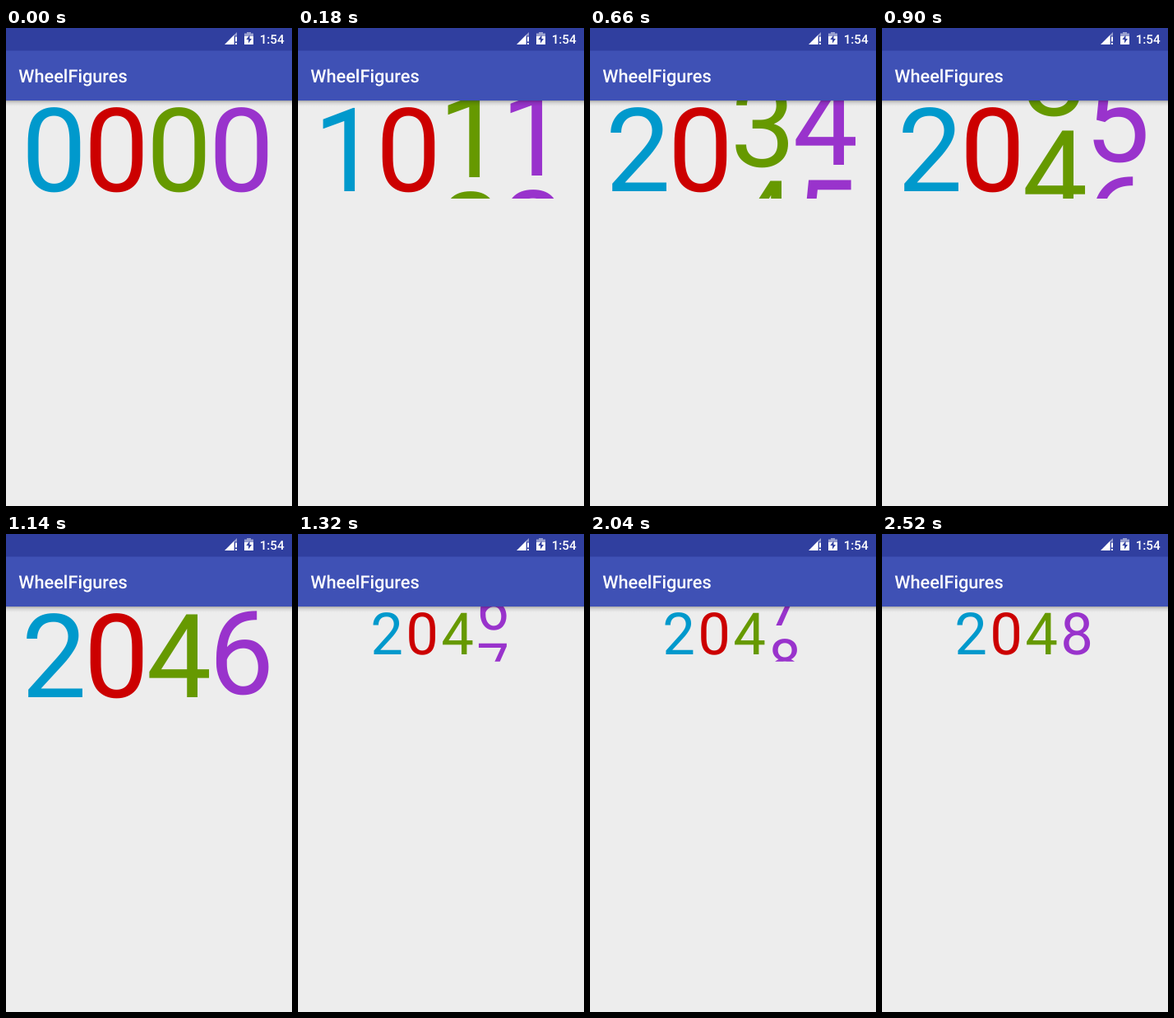
These frames come from a looping animation (348 by 580 pixels, 3.72 s). An HTML page:

```html
<!DOCTYPE html>
<html lang="en">
<head>
<meta charset="utf-8">
<title>Rolling digits</title>
<style>
  html, body { margin: 0; width: 100%; height: 100%; overflow: hidden; background: #ededed; }
  svg { display: block; width: 100%; height: 100%; }
  text { font-family: Roboto, sans-serif; text-rendering: geometricPrecision; }
  .medium { font-weight: 500; fill: #fff; }
</style>
</head>
<body>
<svg viewBox="0 0 348 580">
  <defs>
    <linearGradient id="shade" x2="0" y2="1">
      <stop offset="0" stop-opacity=".28"/>
      <stop offset=".4" stop-opacity=".1"/>
      <stop offset="1" stop-opacity="0"/>
    </linearGradient>
    <clipPath id="window"><rect id="hole" y="88" width="348"/></clipPath>
  </defs>
  <rect width="348" height="580" fill="#ededed"/>
  <g id="digits" clip-path="url(#window)" text-anchor="middle"></g>
  <rect y="88" width="348" height="7" fill="url(#shade)"/>
  <rect y="27" width="348" height="61" fill="#3f51b5"/>
  <rect width="348" height="27.5" fill="#303f9f"/>
  <text class="medium" x="15.3" y="65.7" font-size="21.75">WheelFigures</text>
  <text class="medium" x="308.7" y="19" font-size="15.2">1:54</text>
  <g fill="#fff">
    <path d="M266 20L277.7 8.3V20Z"/>
    <path d="M277.7 8.3L281 5V9.5H277.7Z" opacity=".5"/>
    <path d="M279 10.5h2v6h-2zM279 18h2v2h-2z"/>
    <path d="M290 10V6.5h3V5h5v1.5h3V10Z" opacity=".5"/>
    <path d="M290 10h11v10h-11z"/>
  </g>
  <path d="M296.5 8.5L292.3 14h2.7v4.5L299 13h-2.5z" fill="#303f9f"/>
</svg>
<script>
const LOOP = 3720, TICK = 60, END = 2520, SHRINK = 1200;
const BIG = { size: 141.4, pitch: 75.95, height: 118.9, base: 198.3 };
const SMALL = { size: 70.7, pitch: 43, height: 66.7, base: 146 };
const MIDDLE = 172.5;

// Scroll steps completed at given times: [ms, steps]
const CLOCK = [[0, 0], [360, 15], [660, 33], [1140, 60], [1620, 89], [2040, 112], [END, 136]];

const hole = document.getElementById("hole");
const group = document.getElementById("digits");

function addText(color) {
  const el = document.createElementNS("http://www.w3.org/2000/svg", "text");
  el.setAttribute("fill", color);
  return group.appendChild(el);
}

const columns = [
  { last: 2, color: "#0099cc", lag: 1 },
  { last: 0, color: "#cc0000", lag: 0 },
  { last: 4, color: "#669900", lag: 0 },
  { last: 8, color: "#9933cc", lag: 0 }
].map(c => ({ ...c, texts: [addText(c.color), addText(c.color)] }));

function stepsAt(t) {
  const i = CLOCK.findIndex(([ms]) => ms >= t);
  if (i < 1) return 0;
  const [t0, s0] = CLOCK[i - 1], [t1, s1] = CLOCK[i];
  return Math.round(s0 + (s1 - s0) * (t - t0) / (t1 - t0));
}

// Each digit rolls at a constant speed, slower the nearer it is to the last one.
function roll(last, steps) {
  for (let digit = 0; digit < last; digit++) {
    const speed = 0.15 * (0.6 + 0.5 * Math.cos(Math.PI * digit / last));
    const need = Math.ceil(1 / speed);
    if (steps < need) return { digit, offset: steps * speed };
    steps -= need;
  }
  return { digit: last, offset: 0 };
}

function draw(now) {
  const t = Math.min(END, Math.floor(now % LOOP / TICK) * TICK);
  const look = t < SHRINK ? BIG : SMALL;
  const steps = stepsAt(t);
  hole.setAttribute("height", look.height);
  group.setAttribute("font-size", look.size);
  columns.forEach((c, i) => {
    const { digit, offset } = roll(c.last, Math.max(0, steps - c.lag));
    c.texts.forEach((el, k) => {
      el.textContent = offset || !k ? digit + k : "";
      el.setAttribute("x", MIDDLE + (i - 1.5) * look.pitch);
      el.setAttribute("y", look.base + (k - offset) * look.height);
    });
  });
}

function loop() {
  draw(performance.now());
  requestAnimationFrame(loop);
}
loop();
</script>
</body>
</html>
```
